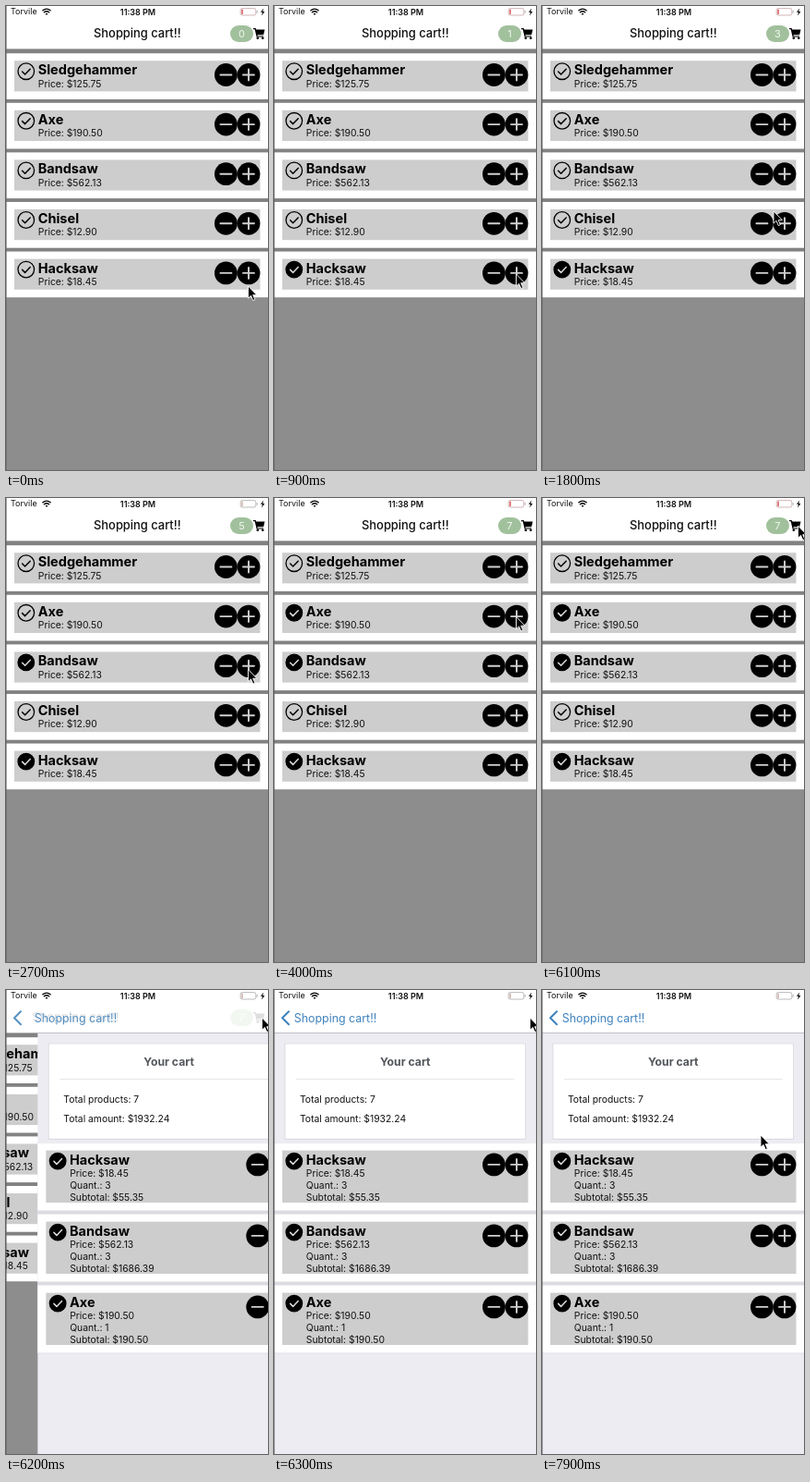
These frames come from a looping animation (284x502 px, 8 s). An HTML page:

```html
<!DOCTYPE html>
<html lang="en">
<head>
<meta charset="utf-8">
<title>Shopping cart</title>
<style>
  html, body { margin: 0; width: 100%; height: 100%; overflow: hidden; background: #8d8d8d; }
  svg { display: block; width: 284px; height: 502px; }
  text { font-family: Inter, "Open Sans", sans-serif; fill: #111; white-space: pre; }
  .name { font-size: 14.5px; font-weight: 700; fill: #000; }
  .info { font-size: 10.35px; }
  .status { font-size: 9px; }
  .title { font-size: 12.9px; font-weight: 500; text-anchor: middle; }
  .back { font-size: 12.4px; fill: #3f83bd; }
  .heading { font-size: 12.2px; font-weight: 700; fill: #53575c; text-anchor: middle; }
  .badge { font-size: 11px; fill: #f2f7f0; text-anchor: middle; }
  .line { fill: none; stroke-linecap: round; stroke-linejoin: round; }
</style>
</head>
<body>
<svg id="stage" viewBox="0 0 284 502"></svg>
<script>
const LOOP = 8000, W = 284;
const products = [
  ["Sledgehammer", "125.75"], ["Axe", "190.50"], ["Bandsaw", "562.13"],
  ["Chisel", "12.90"], ["Hacksaw", "18.45"]
];
const cart = [[4, 3, "55.35"], [2, 3, "1686.39"], [1, 1, "190.50"]];

// [time, product index] of each tap on a plus button
const taps = [[600, 4], [1100, 4], [1500, 4], [2400, 2], [2600, 2], [2950, 2], [3500, 1]];
// [time, x, y] of the pointer tip
const path = [
  [0, 262.5, 303], [100, 262.5, 303], [400, 262.5, 290], [1500, 262.5, 290],
  [1800, 251, 222], [2300, 262.5, 185.5], [2950, 262.5, 185.5],
  [3450, 262.5, 128.5], [4000, 262.5, 128.5], [4800, 276, 27],
  [5200, 277.5, 30], [6500, 277.5, 30], [7300, 247, 145], [7800, 237, 157], [8000, 237, 157]
];
const PUSH_START = 6110, PUSH_END = 6290;

const rect = (x, y, w, h, fill, more = "") =>
  `<rect x="${x}" y="${y}" width="${w}" height="${h}" fill="${fill}" ${more}/>`;
const text = (cls, x, y, s, more = "") => `<text class="${cls}" x="${x}" y="${y}" ${more}>${s}</text>`;
const line = (d, color, width, more = "") =>
  `<path class="line" d="${d}" stroke="${color}" stroke-width="${width}" ${more}/>`;

const button = (x, y, plus) =>
  `<circle cx="${x}" cy="${y}" r="12.4"/>` +
  line(`M${x - 6} ${y}h12${plus ? `M${x} ${y - 6}v12` : ""}`, "#d0d0d0", 1.9);

const check = (y, checked) =>
  `<g class="check"><circle cx="21.8" cy="${y}" r="8.8" fill="${checked ? "#000" : "none"}" stroke="#000" stroke-width="1.3"/>` +
  line(`M17.6 ${y + .3}l3 3 5.6-5.8`, checked ? "#ddd" : "#000", 1.5) + `</g>`;

// A white card with its grey product panel; y is the top of the panel
function item(y, name, infos, height, checked) {
  return rect(0, y - 8, W, height + 16.5, "#fff") +
    rect(9, y, 266.5, height, "#cdcdcd") + check(y + 11.5, checked) +
    text("name", 34.7, y + 15, name) +
    infos.map((s, i) => text("info", 34.8, y + 28.3 + i * 12.8, s)).join("") +
    button(238.4, y + 15.3, false) + button(263, y + 15.3, true);
}

const listView = rect(0, 46, W, 456, "#8d8d8d") + rect(0, 46, W, 270, "#828282") +
  products.map(([name, price], i) => item(59.2 + i * 53.6, name, ["Price: $" + price], 33.2)).join("");

const cartView = rect(0, 46, W, 456, "#eeecf3") +
  rect(11.4, 57.6, 261.4, 104.4, "#dcdae1") + rect(12.4, 58.4, 259.6, 102.4, "#fff") +
  text("heading", 142.3, 82, "Your cart") + rect(24, 96.2, 236.5, .8, "#e1e1e6") +
  text("info", 28, 122.3, "Total products: 7") + text("info", 28, 143, "Total amount: $1932.24") +
  rect(0, 165, W, 228.3, "#dddbe1") +
  cart.map(([p, n, sum], i) => item(173.6 + i * 77, products[p][0],
    ["Price: $" + products[p][1], "Quant.: " + n, "Subtotal: $" + sum], 56.4, true)).join("");

const cartIcon = `<g id="cartIcon"><path d="M268 24h2.6l.7 1.5h9.2l-1.4 5.7h-6.7l.3 1.2h6.3v1.2h-7.4l-1.9-8.3H268z"/>
  <circle cx="272.8" cy="34.8" r="1.3"/><circle cx="278.3" cy="34.8" r="1.3"/></g>`;

const statusBar = text("status", 5, 9.4, "Torvile") +
  text("status", 143, 9.5, "11:38 PM", 'text-anchor="middle" font-weight="600"') +
  line("M39.9 4.8q4.1-3.4 8.2 0M41.4 6.8q2.6-2.1 5.2 0", "#000", 1.4) +
  `<path d="M42.6 8.3q1.4-1 2.8 0L44 9.9z"/>` +
  `<rect id="battery" x="254.2" y="2.6" width="16.6" height="7.4" rx="1.8" fill="none" stroke-width=".8"/>` +
  rect(271.6, 4.9, 1, 2.8, "#aaa", 'rx=".5"') + rect(255.2, 3.6, 1.7, 5.4, "#e0696b", 'id="charge" rx=".6"') +
  `<path d="M279.2 2.6l-3.2 4.2h2l-1 3.6 3.4-4.5h-2.1z"/>`;

const stage = document.getElementById("stage");
stage.innerHTML =
  `<g id="list">${listView}</g><g id="cart">${cartView}</g>` +
  rect(0, 0, W, 46.3, "#fff") + rect(0, 46, W, .8, "#b5b5b8") +
  `<g id="listHead">${text("title", 142.3, 34.3, "Shopping cart!!", 'id="title"')}
    ${rect(243, 21, 25, 18, "#a1c09c", 'rx="9"')}${text("badge", 255.4, 34, "0", 'id="count"')}${cartIcon}</g>` +
  `<g id="cartHead">${line("M16 23.3l-7 7 7 7", "#3f83bd", 2)}${text("back", 21.8, 34.6, "Shopping cart!!", 'id="back"')}</g>` +
  statusBar + rect(0, 0, .6, 502, "#666") +
  `<path id="pointer" d="M0 0V13.2l3-2.8 2.3 5.2 2.1-.9-2.2-5h4.2z" stroke="#fff" stroke-width=".9" stroke-linejoin="round"/>`;

const el = id => document.getElementById(id);
const move = (id, x, y = 0) => el(id).setAttribute("transform", `translate(${x} ${y})`);
const checks = [...el("list").querySelectorAll(".check")];

function pointerAt(t) {
  const i = path.findIndex(p => p[0] > t);
  const [t0, x0, y0] = path[i - 1], [t1, x1, y1] = path[i];
  const k = (t - t0) / (t1 - t0), e = k * k * (3 - 2 * k);
  return [x0 + (x1 - x0) * e, y0 + (y1 - y0) * e];
}

function draw(t) {
  const done = taps.filter(p => p[0] <= t);
  el("count").textContent = done.length;
  checks.forEach((g, i) => {
    const on = done.some(p => p[1] === i);
    g.firstChild.setAttribute("fill", on ? "#000" : "none");
    g.lastChild.setAttribute("stroke", on ? "#ddd" : "#000");
  });

  const k = Math.min(1, Math.max(0, (t - PUSH_START) / (PUSH_END - PUSH_START)));
  const push = 1 - (1 - k) ** 3;
  move("list", -85 * push);
  move("cart", W * (1 - push));
  move("title", -76 * push);
  move("back", 74 * (1 - push));
  el("listHead").setAttribute("opacity", 1 - push);
  el("cartHead").setAttribute("opacity", push);

  const pale = (t >= 2500 && t < 2900) || t >= 6200;
  el("battery").setAttribute("stroke", pale ? "#aaa" : "#c9a3a6");
  el("charge").setAttribute("fill", pale ? "#d8b9b2" : "#e0696b");
  move("pointer", ...pointerAt(t));
}

const start = performance.now();
function tick() {
  draw((performance.now() - start) % LOOP);
  requestAnimationFrame(tick);
}
tick();
</script>
</body>
</html>
```
